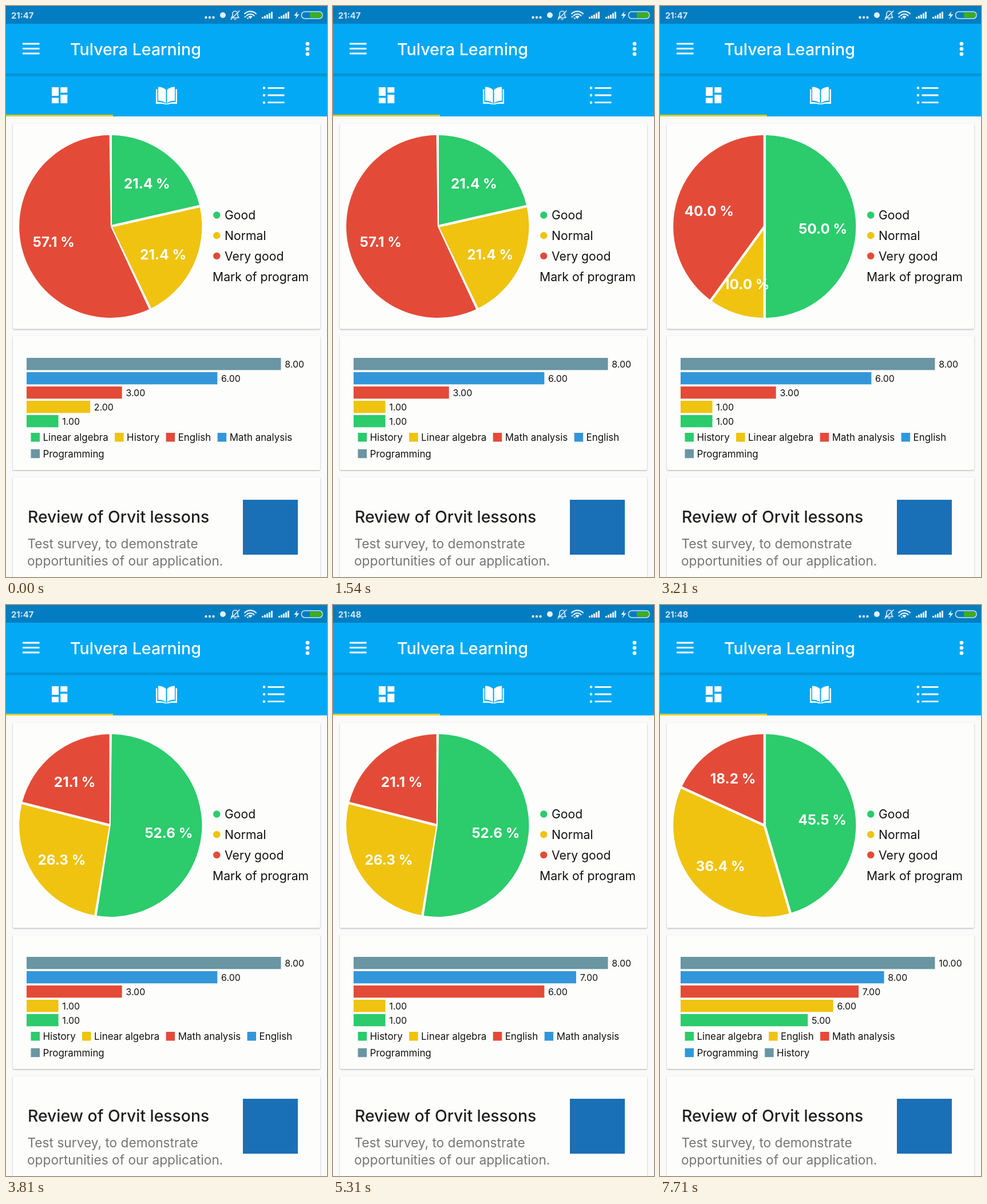
An HTML page for the animation above (8 s loop, 561 by 998 pixels).

```html
<!DOCTYPE html>
<html lang="en">
<head>
<meta charset="utf-8">
<title>Survey dashboard</title>
<style>
  html, body { margin: 0; width: 100%; height: 100%; overflow: hidden; background: #fafafa; }
  svg { display: block; width: 561px; height: 998px; font-family: Inter, Roboto, sans-serif; }
  .card { fill: #fdfefc; filter: drop-shadow(0 1px 1px rgba(0, 0, 0, .32)); }
  .pct { font-size: 24.3px; font-weight: 700; fill: #fff; text-anchor: middle; }
  .val { font-size: 16px; fill: #111; }
  .key { font-size: 16.9px; fill: #111; }
  .side { font-size: 21.2px; fill: #111; }
  .info { font-size: 22.7px; fill: #757575; }
</style>
</head>
<body>
<svg viewBox="0 0 561 998">
  <defs>
    <linearGradient id="shade" x1="0" y1="0" x2="0" y2="1">
      <stop offset="0" stop-color="#000" stop-opacity=".2"/>
      <stop offset="1" stop-color="#000" stop-opacity="0"/>
    </linearGradient>
    <path id="signal" d="M0 19h3v3H0zM4 17h3v5H4zM8 15h3v7H8zM12 12.500h3v9.500h-3zM16 10h3v12h-3z" fill="#e3f1fa"/>
  </defs>

  <rect width="561" height="998" fill="#fafafa"/>
  <rect width="561" height="193" fill="#03a9f4"/>
  <rect width="561" height="31" fill="#027dc1"/>
  <rect y="118.500" width="561" height="6" fill="url(#shade)"/>
  <rect y="190" width="187" height="3" fill="#e0cc18"/>

  <!-- status bar -->
  <text id="clock" x="9" y="22" font-size="14.800" font-weight="700" fill="#d5e9f5"></text>
  <g fill="#e3f1fa">
    <circle cx="349.500" cy="20" r="2.200"/><circle cx="356" cy="20" r="2.200"/><circle cx="362.500" cy="20" r="2.200"/>
    <circle cx="379" cy="16" r="5"/>
    <path d="M509.500 9l-6 8h4l-2 6 7-8.500h-4.500z"/>
  </g>
  <g fill="none" stroke="#e3f1fa" stroke-width="1.600" stroke-linecap="round" stroke-linejoin="round">
    <path d="M394 20.500h13l-2-3v-4a4.500 4.500 0 0 0-9 0v4zM399 23h3M408 8.500L393 23.500"/>
    <path d="M417 13.500a14 14 0 0 1 20 0M420.500 17a9 9 0 0 1 13 0" stroke-width="2.200"/>
  </g>
  <path d="M427 22.500l-3.800-4a5.500 5.500 0 0 1 7.600 0z" fill="#e3f1fa"/>
  <path id="traffic" d="M416 20l2-3 2 3zM420.500 20.500h4l-2 3z" fill="#e3f1fa"/>
  <use href="#signal" x="447"/><use href="#signal" x="476"/>
  <rect x="516.500" y="10" width="36.500" height="12" rx="5.500" fill="none" stroke="#d5e9f5" stroke-width="1.500"/>
  <path d="M531 11.500h17a4.500 4.500 0 0 1 0 9h-17z" fill="#3fae1c"/>

  <!-- toolbar and tabs -->
  <g fill="#fff">
    <path d="M29 64.500h29.500v3H29zM29 73h29.500v3H29zM29 81.500h29.500v3H29z"/>
    <text x="112" y="85.500" font-size="28.600" font-weight="500">Tulvera Learning</text>
    <circle cx="527" cy="66" r="3.300"/><circle cx="527" cy="75" r="3.300"/><circle cx="527" cy="84" r="3.300"/>
    <path d="M80 142h12v15H80zM80 160.500h12V170H80zM95.300 142h12v9.500h-12zM95.300 155h12v15h-12z"/>
    <path d="M279.500 146.500q-5-5-13.500-5v24q9 0 13.500 4.500zM281.500 146.500q5-5 13.500-5v24q-9 0-13.500 4.500z"/>
    <path d="M262 145.500h2.500V168q9-.5 14.500 2.500h3q5.500-3 14.500-2.500v-22.500h2.500V171q-11-1-15.500 1h-6q-4.500-2-15.500-1z"/>
    <circle cx="451" cy="143.300" r="2.200"/><circle cx="451" cy="156" r="2.200"/><circle cx="451" cy="168.700" r="2.200"/>
    <path d="M457.500 142h29v2.800h-29zM457.500 154.600h29v2.800h-29zM457.500 167.300h29v2.800h-29z"/>
  </g>

  <rect class="card" x="12" y="206" width="537" height="358.500" rx="2.500"/>
  <rect class="card" x="12" y="577" width="537" height="234" rx="2.500"/>
  <rect class="card" x="12" y="823.500" width="537" height="190" rx="2.500"/>

  <g id="pie"></g>
  <g id="marks"></g>
  <g id="bars"></g>

  <text x="38" y="902.500" font-size="28.300" font-weight="500" fill="#202020">Review of Orvit lessons</text>
  <text class="info" x="37.500" y="948">Test survey, to demonstrate</text>
  <text class="info" x="37" y="977.500">opportunities of our application.</text>
  <rect x="414" y="863" width="96" height="96" fill="#1a70b6"/>
</svg>
<script>
const LOOP = 8000;
const COLORS = ['#2ccb6c', '#efc310', '#e34b38', '#3296d9', '#6a95a3'];
const $ = id => document.getElementById(id);

// Each row: start time, then the value that holds from there on.
const PIE = [
  [0, [3, 3, 8]],
  [1620, [3, 2, 8]],
  [2910, [5, 1, 4]],
  [3810, [10, 5, 4]],
  [7450, [10, 8, 4]]
];
const L = 'Linear algebra', H = 'History', E = 'English', M = 'Math analysis', P = 'Programming';
const BARS = [
  [0, [[L, 1], [H, 2], [E, 3], [M, 6], [P, 8]]],
  [510, [[L, 1], [H, 2], [E, 3], [M, 3], [P, 8]]],
  [1540, [[H, 1], [L, 1], [M, 3], [E, 6], [P, 8]]],
  [5150, [[H, 1], [L, 1], [E, 6], [M, 7], [P, 8]]],
  [5950, [[L, 1], [E, 6], [M, 7], [P, 8], [H, 10]]],
  [6850, [[L, 5], [E, 6], [M, 7], [P, 8], [H, 10]]]
];
const CLOCK = [[0, '21:47'], [5010, '21:48']];
const TRAFFIC = [[0, 'visible'], [470, 'hidden'], [1070, 'visible']];

function add(parent, tag, attrs, text) {
  const el = document.createElementNS('http://www.w3.org/2000/svg', tag);
  for (const k in attrs) el.setAttribute(k, attrs[k]);
  if (text) el.textContent = text;
  parent.appendChild(el);
  return el;
}

// Angles run clockwise from the top.
const polar = (x, y, r, a) => [x + r * Math.sin(a), y - r * Math.cos(a)];

function drawPie(parts) {
  const g = $('pie'), cx = 182.8, cy = 385.3, R = 159.6, half = 2.2;
  const sum = parts.reduce((a, b) => a + b);
  const labels = [];
  let from = 0;
  g.replaceChildren();
  parts.forEach((n, i) => {
    const sweep = n / sum * Math.PI * 2, mid = from + sweep / 2, pad = half / R;
    const inset = sweep > Math.PI + .001 ? 0 : half / Math.sin(sweep / 2);
    const tip = polar(cx, cy, inset, mid);
    const a = polar(cx, cy, R, from + pad), b = polar(cx, cy, R, from + sweep - pad);
    const large = sweep - 2 * pad > Math.PI ? 1 : 0;
    add(g, 'path', { d: `M${tip}L${a}A${R} ${R} 0 ${large} 1 ${b}Z`, fill: COLORS[i] });
    labels.push([polar(cx, cy, 102, mid), (n / sum * 100).toFixed(1) + ' %']);
    from += sweep;
  });
  for (const [[x, y], text] of labels) add(g, 'text', { class: 'pct', x, y: y + 13 }, text);
}

function drawBars(rows) {
  const g = $('bars'), max = Math.max(...rows.map(r => r[1]));
  let x = 43.5, y = 746;
  g.replaceChildren();
  rows.forEach(([name, n], i) => {
    const w = n / max * 444.5, top = 715 - i * 25;
    add(g, 'rect', { x: 36, y: top, width: w, height: 21.3, fill: COLORS[i] });
    add(g, 'text', { class: 'val', x: 42.7 + w, y: top + 17 }, n.toFixed(2));

    const box = add(g, 'rect', { width: 15.5, height: 15.5, fill: COLORS[i] });
    const key = add(g, 'text', { class: 'key' }, name);
    const len = key.getComputedTextLength();
    if (x + 21 + len > 520) { x = 43.5; y += 28.7; }
    box.setAttribute('x', x);
    box.setAttribute('y', y);
    key.setAttribute('x', x + 21);
    key.setAttribute('y', y + 14);
    x += 32.4 + len;
  });
}

['Good', 'Normal', 'Very good'].forEach((name, i) => {
  const y = 365.5 + i * 35.7;
  add($('marks'), 'circle', { cx: 368.3, cy: y, r: 6.2, fill: COLORS[i] });
  add($('marks'), 'text', { class: 'side', x: 382, y: y + 7.8 }, name);
});
add($('marks'), 'text', { class: 'side', x: 361, y: 480.5 }, 'Mark of program');

const tracks = [
  [PIE, drawPie],
  [BARS, drawBars],
  [CLOCK, v => { $('clock').textContent = v; }],
  [TRAFFIC, v => $('traffic').setAttribute('visibility', v)]
].map(([steps, draw]) => ({ steps, draw, now: null }));

function render(t) {
  for (const track of tracks) {
    const step = track.steps.filter(s => s[0] <= t).pop();
    if (step !== track.now) track.draw((track.now = step)[1]);
  }
}

const start = performance.now();
function tick() {
  render((performance.now() - start) % LOOP);
  requestAnimationFrame(tick);
}
tick();
</script>
</body>
</html>
```
